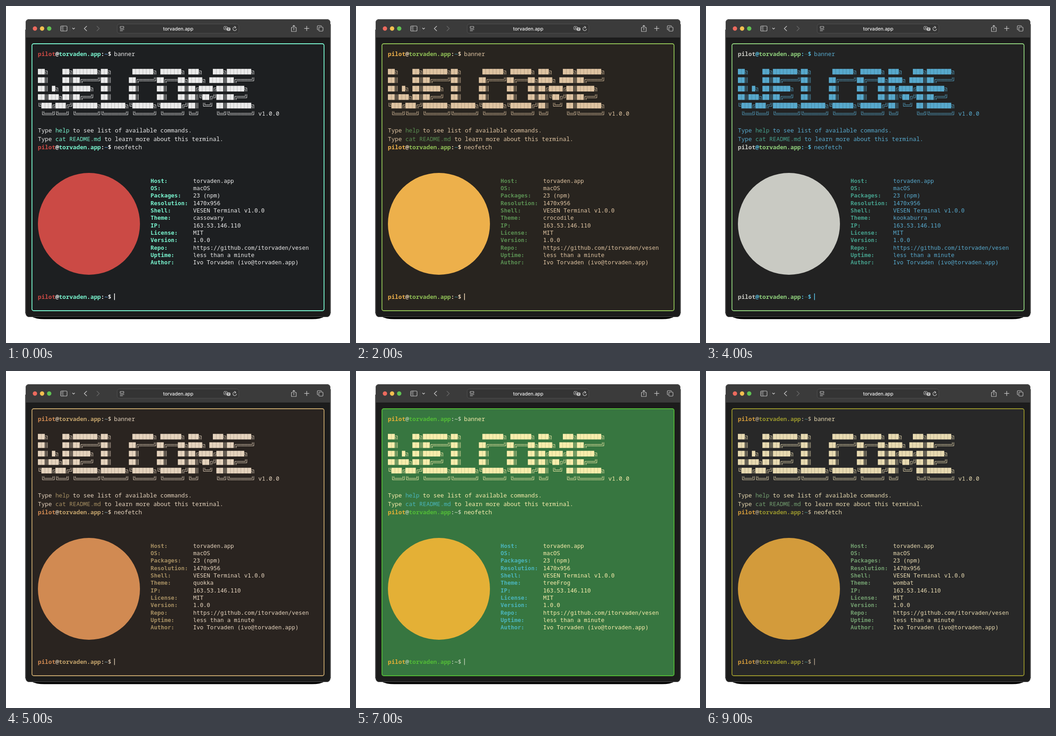
An HTML page that plays this animation: 755 px wide and 741 px high, repeating every 10 s.

```html
<!DOCTYPE html>
<html lang="en">
<head>
<meta charset="utf-8">
<title>Terminal themes</title>
<style>
  html, body { margin: 0; width: 100%; height: 100%; overflow: hidden; background: #fff; }
  svg { display: block; width: 755px; height: 741px; }
  text { white-space: pre; }
  #shell text { font: 12.8px "Noto Sans Mono", monospace; fill: var(--fg); }
  #shell .bold { font-weight: 700; }
  #info text { font: 12.41px "DejaVu Sans Mono", monospace; fill: var(--fg); }
  #info .label { font-weight: 700; fill: var(--accent); }
  #shell .user { fill: var(--user); }
  #shell .host { fill: var(--host); }
  #shell .mark { fill: var(--mark); }
  #shell .path { fill: var(--path); }
  #shell .accent { fill: var(--accent); }
  #panel { fill: var(--bg); stroke: var(--host); stroke-width: 1.8; }
  #blocks { fill: var(--fg); }
  #lines { fill: none; stroke: var(--fg); stroke-width: 1; }
  #disc { fill: var(--user); }
  #cursor { fill: var(--mark); }
  .icon { fill: none; stroke: #c6c6c6; stroke-width: 1.15; stroke-linecap: round; stroke-linejoin: round; }
</style>
</head>
<body>
<svg viewBox="0 0 755 741">
  <path d="M56 683Q66 688.5 84 688.5H672Q690 688.5 699 683Z"/>
  <path d="M42.8 52V676M712.2 40V676" stroke="#000"/>
  <rect x="43" y="29" width="669" height="655" rx="8" fill="#1c1c1c"/>
  <path d="M43 70V37Q43 29 51 29H704Q712 29 712 37V70Z" fill="#3b3b3b"/>
  <path d="M43 70H712" stroke="#151515"/>
  <rect x="43.5" y="29.5" width="668" height="654" rx="7.5" fill="none" stroke="#555"/>

  <circle cx="63.5" cy="49.6" r="4.8" fill="#ec6a5e"/>
  <circle cx="79.2" cy="49.6" r="4.8" fill="#f4bf4f"/>
  <circle cx="94.8" cy="49.6" r="4.8" fill="#61c454"/>
  <rect x="244" y="39.5" width="267" height="20.5" rx="5" fill="#343434" stroke="#505050"/>
  <text x="378" y="53.6" text-anchor="middle" fill="#f2f2f2"
        style="font:500 10.4px Inter,sans-serif">torvaden.app</text>
  <g class="icon">
    <rect x="120" y="44" width="14" height="11" rx="2"/>
    <path d="M125 44V55M122 46.5H123M122 48.7H123M122 51H123" stroke-width=".9"/>
    <path d="M140.5 44V55" stroke="#484848"/>
    <path d="M146 48.5L148.3 50.8L150.6 48.5" stroke-width="1.4"/>
    <path d="M177 44.5L171.8 49.5L177 54.5" stroke-width="1.4"/>
    <path d="M199.6 44.5L204.8 49.5L199.6 54.5" stroke="#666" stroke-width="1.4"/>
    <path d="M251 45H258.5V49H251ZM250.5 51.7H259M250.5 54.5H256" stroke-width="1"/>
    <rect x="478" y="45" width="8" height="7" rx="2" stroke-width=".9"/>
    <path d="M480.3 50L482 46.7L483.7 50M481 49H483" stroke-width=".8"/>
    <rect x="484.5" y="47.5" width="8" height="7" rx="2" fill="#d5d5d5" stroke="none"/>
    <path d="M486.5 49.8H490.5M487 53L490 49.8M487.3 50.2L490.3 53" stroke="#343434" stroke-width=".8"/>
    <path d="M504.5 47A4 4 0 1 0 506 50.5M501.8 44.6L504.7 47L502 49"/>
    <path d="M629 47.3H626.5V56H637V47.3H634.5M631.7 52.5V42.5M629.2 45L631.7 42.5L634.2 45"/>
    <path d="M655 49.3H665M660 44.3V54.3" stroke-width="1.3"/>
    <rect x="686.7" y="46.2" width="9" height="9" rx="1.8"/>
    <path d="M684.8 52.5Q683.3 52.4 683.3 50.7V45Q683.3 43.2 685 43.2H690.7Q692.4 43.2 692.6 44.4"/>
  </g>

  <rect id="panel" x="57" y="83" width="641" height="587" rx="4"/>
  <path id="blocks"/>
  <path id="lines"/>
  <g id="shell"></g>
  <circle id="disc" cx="182" cy="479" r="112"/>
  <g id="info"></g>
  <rect id="cursor" x="237.4" y="632" width="1.6" height="14.5"/>
</svg>
<script>
const $ = id => document.getElementById(id);
const LEFT = 70, CELL = 7.68, ROW = 18.64;

const THEME_MS = 1000;
const keys = ['bg', 'host', 'fg', 'user', 'mark', 'path', 'accent'];
const themes = [
  ['cassowary',  '#1d1f21 #79f5cf #ebebeb #cb4a45 #f5f5f5 #5f9fe0 #79f5cf'],
  ['cockatoo',   '#e4dbce #858063 #43363a #e2a653 #8b8a88 #46586a #9b9b9b'],
  ['crocodile',  '#28241f #90c056 #dfc4a2 #edb04b #ead2b4 #40909f #5b9053'],
  ['galah',      '#2b2a30 #d98fa8 #e6d7dc #e2738f #c9c2c6 #8fa5c4 #a9a3ad'],
  ['kookaburra', '#222222 #8fd07c #57a9cd #c9cac3 #57bde0 #2b665f #46a18d'],
  ['quokka',     '#2a2420 #c3a36b #e5d3bd #d18a52 #cbb9a3 #7f9fa8 #a68f62'],
  ['swampHen',   '#232234 #56c197 #ffffff #8a20b0 #b7b7bf #d38459 #6ca9e8'],
  ['treeFrog',   '#377640 #52bb37 #f9edac #e4b036 #b0c6a9 #c9dfc1 #4bb5bb'],
  ['wallaby',    '#2b2826 #a9a583 #e2d8cb #c9805c #b5aaa0 #7d98a5 #9c9a7a'],
  ['wombat',     '#282828 #98952d #e8dab1 #d39b3b #a99a85 #4b8988 #739f70']
];

const span = (cls, text) => `<tspan class="${cls}">${text}</tspan>`;
const line = (x, y, content, cls = '') => `<text x="${x}" y="${y}" class="${cls}">${content}</text>`;

function prompt(y, command) {
  const parts = span('user', 'pilot') + span('mark', '@') + span('host', 'torvaden.app') +
    span('mark', ':') + span('path', '~') + span('mark', '$');
  return line(LEFT, y, parts, 'bold') + line(237, y, command);
}

$('shell').innerHTML =
  prompt(110.2, 'banner') +
  line(LEFT + 63 * CELL, 241, 'v1.0.0') +
  line(LEFT, 278.2, `Type ${span('accent', 'help')} to see list of available commands.`) +
  line(LEFT, 296.9, `Type ${span('accent', 'cat README.md')} to learn more about this terminal.`) +
  prompt(315.4, 'neofetch') +
  prompt(643.8, '');

const details = {
  Host: 'torvaden.app',
  OS: 'macOS',
  Packages: '23 (npm)',
  Resolution: '1470x956',
  Shell: 'VESEN Terminal v1.0.0',
  Theme: '',
  IP: '163.53.146.110',
  License: 'MIT',
  Version: '1.0.0',
  Repo: 'https://github.com/itorvaden/vesen',
  Uptime: 'less than a minute',
  Author: 'Ivo Torvaden (ivo@torvaden.app)'
};
$('info').innerHTML = Object.entries(details).map(([label, value], i) => {
  const y = 388.8 + i * 16.32;
  return line(317.3, y, label + ':', 'label') + line(410.7, y, span('value' + label, value));
}).join('');
const themeName = document.querySelector('.valueTheme');

const banner = [
  '██╗    ██╗███████╗██╗      ██████╗ ██████╗ ███╗   ███╗███████╗',
  '██║    ██║██╔════╝██║     ██╔════╝██╔═══██╗████╗ ████║██╔════╝',
  '██║ █╗ ██║█████╗  ██║     ██║     ██║   ██║██╔████╔██║█████╗  ',
  '██║███╗██║██╔══╝  ██║     ██║     ██║   ██║██║╚██╔╝██║██╔══╝  ',
  '╚███╔███╔╝███████╗███████╗╚██████╗╚██████╔╝██║ ╚═╝ ██║███████╗',
  ' ╚══╝╚══╝ ╚══════╝╚══════╝ ╚═════╝ ╚═════╝ ╚═╝     ╚═╝╚══════╝'
];

// Double-line corners: the side and vertical direction their arms point to.
const corners = { '╔': [1, 1], '╗': [-1, 1], '╚': [1, -1], '╝': [-1, -1] };

function drawBanner() {
  const halfW = CELL / 2, halfH = 6.2, gap = 1.6;
  let blocks = '', lines = '';
  banner.forEach((row, r) => [...row].forEach((char, c) => {
    const x = LEFT + (c + .5) * CELL, y = 144.4 + r * ROW;
    if (char === '█') {
      blocks += `M${x - halfW} ${y - halfH}h7.45v${2 * halfH}h-7.45z`;
      return;
    }
    for (const g of [-gap, gap]) {
      if (char === '═') lines += `M${x - halfW} ${y + g}h${CELL}`;
      if (char === '║') lines += `M${x + g} ${y - halfH}v${2 * halfH}`;
      if (corners[char]) {
        const [dx, dy] = corners[char];
        lines += `M${x + dx * halfW} ${y + dy * g}H${x + dx * g}V${y + dy * halfH}`;
      }
    }
  }));
  $('blocks').setAttribute('d', blocks);
  $('lines').setAttribute('d', lines);
}

let current = -1;
function frame() {
  const index = Math.floor(performance.now() / THEME_MS) % themes.length;
  if (index !== current) {
    current = index;
    const [name, palette] = themes[index];
    palette.split(' ').forEach((color, i) =>
      document.documentElement.style.setProperty('--' + keys[i], color));
    themeName.textContent = name;
  }
  requestAnimationFrame(frame);
}

drawBanner();
frame();
</script>
</body>
</html>
```
